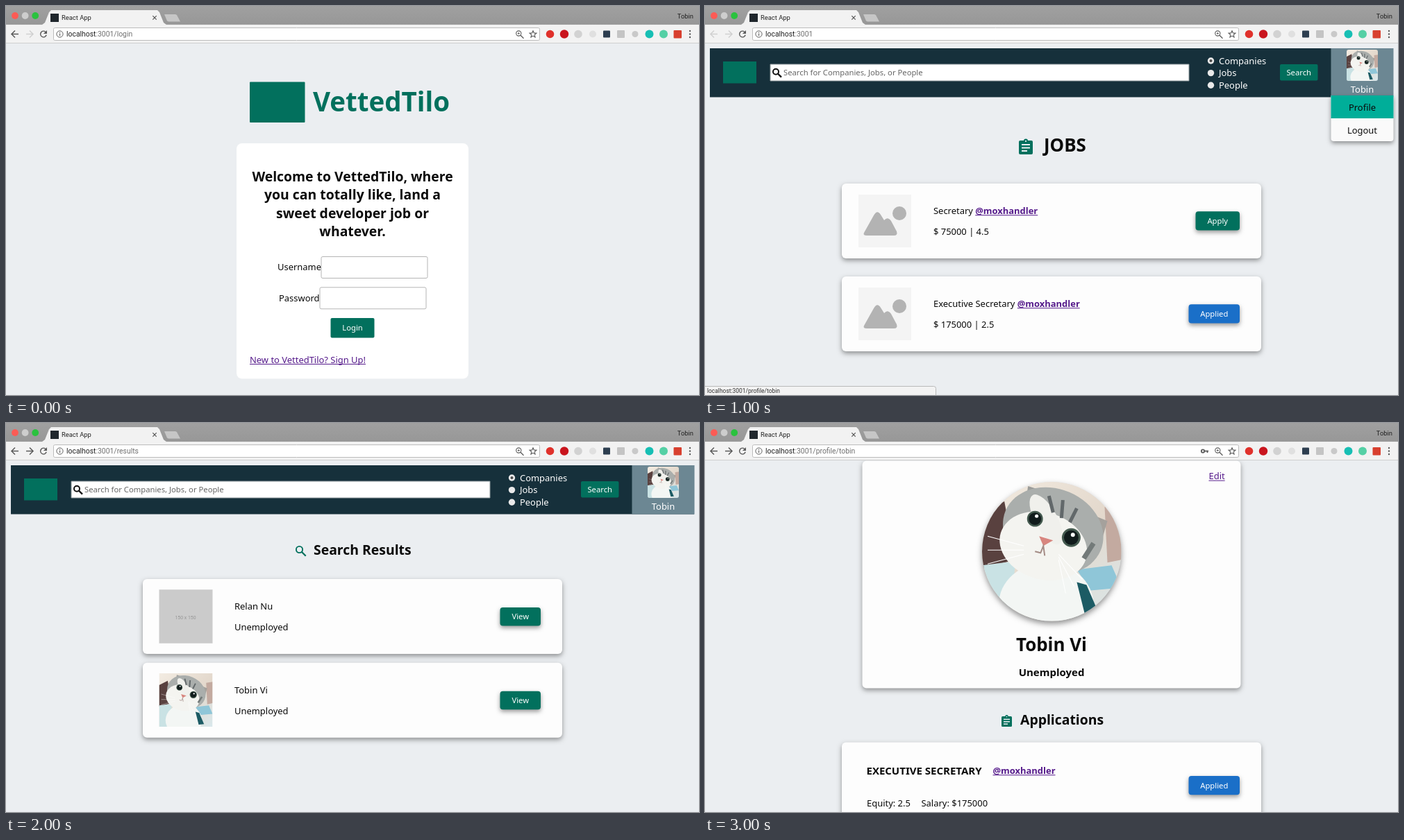
Recreate the animation shown at these times as an HTML page with a canvas. Size 998x561 px, loop 4000 ms.

```html
<!DOCTYPE html>
<html lang="en">
<head>
<meta charset="utf-8">
<title>Job board walkthrough</title>
<style>
html, body { margin: 0; width: 100%; height: 100%; overflow: hidden; background: #ebeef1; }
canvas { display: block; }
</style>
</head>
<body>
<canvas id="stage" width="998" height="561"></canvas>
<script>
const ctx = document.getElementById('stage').getContext('2d');
const PAGE = '"Noto Sans", "Open Sans", sans-serif';
const CHROME = 'Roboto, "Liberation Sans", sans-serif';
const GREEN = '#02705d', BLUE = '#1a6fc8', PURPLE = '#551a8b', INK = '#0a0a0a';
const BASE = 12.95, SMALL = 11.25;
const USER = 'Tobin', FULL_NAME = 'Tobin Vi', BRAND = 'VettedTilo', COMPANY = '@moxhandler';

function rect(x, y, w, h, fill, r = 0, stroke) {
  ctx.beginPath();
  ctx.roundRect(x, y, w, h, r);
  if (fill) { ctx.fillStyle = fill; ctx.fill(); }
  if (stroke) { ctx.strokeStyle = stroke; ctx.lineWidth = 1; ctx.stroke(); }
}

function disc(x, y, r, fill) {
  ctx.beginPath();
  ctx.arc(x, y, r, 0, Math.PI * 2);
  ctx.fillStyle = fill;
  ctx.fill();
}

function oval(x, y, rx, ry, turn, fill) {
  ctx.beginPath();
  ctx.ellipse(x, y, rx, ry, turn, 0, Math.PI * 2);
  ctx.fillStyle = fill;
  ctx.fill();
}

function ring(x, y, r, color, width, from = 0, to = Math.PI * 2) {
  ctx.beginPath();
  ctx.arc(x, y, r, from, to);
  ctx.strokeStyle = color;
  ctx.lineWidth = width;
  ctx.stroke();
}

function poly(points, fill) {
  ctx.beginPath();
  points.forEach(([x, y]) => ctx.lineTo(x, y));
  ctx.closePath();
  ctx.fillStyle = fill;
  ctx.fill();
}

function line(points, color, width) {
  ctx.beginPath();
  points.forEach(([x, y]) => ctx.lineTo(x, y));
  ctx.strokeStyle = color;
  ctx.lineWidth = width;
  ctx.stroke();
}

// Draws text and returns its width.
function text(str, x, y, { size = BASE, weight = 400, color = INK, align = 'left', font = PAGE } = {}) {
  ctx.font = `${weight} ${size}px ${font}`;
  ctx.textAlign = align;
  ctx.fillStyle = color;
  ctx.fillText(str, x, y);
  return ctx.measureText(str).width;
}

function link(str, x, y, weight = 400) {
  const w = text(str, x, y, { weight, color: PURPLE });
  rect(x, y + 1.3, w, 1, PURPLE);
}

function shadowed(blur, dy, alpha, paint) {
  ctx.save();
  ctx.shadowColor = `rgba(0,0,0,${alpha})`;
  ctx.shadowBlur = blur;
  ctx.shadowOffsetY = dy;
  paint();
  ctx.restore();
}

function card(x, y, w, h) {
  shadowed(7, 3, 0.4, () => rect(x, y, w, h, '#fdfdfd', 6));
}

function button(label, x, y, w, h, fill = GREEN, raised = true) {
  const paint = () => rect(x, y, w, h, fill, raised ? 4 : 2);
  raised ? shadowed(6, 3, 0.4, paint) : paint();
  text(label, x + w / 2, y + h / 2 + 4, { size: SMALL, weight: 500, color: '#fff', align: 'center' });
}

function glass(x, y, r, color, width) {
  ring(x, y, r, color, width);
  line([[x + r * 0.7, y + r * 0.7], [x + r * 2, y + r * 2]], color, width * 1.2);
}

function arrow(x, dir, color) {
  line([[x - 5 * dir, 40.5], [x + 5 * dir, 40.5]], color, 1.5);
  line([[x, 35.5], [x + 5 * dir, 40.5], [x, 45.5]], color, 1.5);
}

function clipboard(x, y, w) {
  const u = w / 20;
  rect(x, y + 2.5 * u, w, 20 * u, GREEN, 2 * u);
  disc(x + w / 2, y + 3 * u, 3 * u, GREEN);
  disc(x + w / 2, y + 3.4 * u, 1.1 * u, '#ebeef1');
  [[7.5, 12], [12, 12], [16.5, 8]].forEach(([dy, len]) =>
    rect(x + 4 * u, y + dy * u, len * u, 2 * u, '#ebeef1'));
}

function star(x, y, r) {
  ctx.beginPath();
  for (let i = 0; i < 10; i++) {
    const a = i * Math.PI / 5 - Math.PI / 2, d = i % 2 ? r * 0.45 : r;
    ctx.lineTo(x + d * Math.cos(a), y + d * Math.sin(a));
  }
  ctx.closePath();
  ctx.strokeStyle = '#5c5c5c';
  ctx.lineWidth = 1.1;
  ctx.stroke();
}

// Cat portrait in flat shapes, drawn in a unit square.
function cat(x, y, size, r) {
  ctx.save();
  ctx.beginPath();
  ctx.roundRect(x, y, size, size, r);
  ctx.clip();
  ctx.translate(x, y);
  ctx.scale(size, size);
  const wall = ctx.createLinearGradient(0, 0, 1, 1);
  wall.addColorStop(0, '#f3ece2');
  wall.addColorStop(0.55, '#e3d8cc');
  wall.addColorStop(1, '#d9e8ec');
  rect(0, 0, 1, 1, wall);
  poly([[0, 0.22], [0.16, 0.14], [0.24, 0.56], [0, 0.62]], '#59413f');
  poly([[0.88, 0.18], [1, 0.16], [1, 0.56], [0.9, 0.58]], '#c3aaa0');
  poly([[0.68, 0.63], [0.93, 0.6], [1, 0.76], [0.78, 0.78]], '#8fc6d8');
  poly([[0, 0.6], [0.24, 0.57], [0.2, 1], [0, 1]], '#c9e2e4');
  oval(0.46, 0.88, 0.34, 0.3, 0, '#f3f6f4');
  poly([[0.68, 0.72], [0.75, 0.74], [0.84, 0.95], [0.74, 0.96]], '#1c5b64');
  poly([[0.3, 0.24], [0.33, 0.03], [0.55, 0.1]], '#9b9c9a');
  poly([[0.7, 0.2], [0.9, 0.28], [0.83, 0.52]], '#a5a19c');
  oval(0.51, 0.35, 0.37, 0.3, 0.4, '#aaaeac');
  oval(0.44, 0.46, 0.32, 0.24, 0.3, '#f4f4f0');
  oval(0.46, 0.27, 0.08, 0.2, -0.5, '#f0f0ec');
  line([[0.48, 0.1], [0.51, 0.22]], '#62686a', 0.025);
  line([[0.58, 0.13], [0.57, 0.26]], '#62686a', 0.025);
  line([[0.68, 0.19], [0.63, 0.29]], '#62686a', 0.025);
  line([[0.8, 0.44], [0.73, 0.55]], '#737a79', 0.035);
  [[0.38, 0.265, 0.057], [0.64, 0.4, 0.067]].forEach(([ex, ey, er]) => {
    disc(ex, ey, er, '#43594e');
    disc(ex, ey, er * 0.78, '#111c1c');
    disc(ex + 0.012, ey - 0.02, er * 0.22, '#fff');
  });
  poly([[0.41, 0.39], [0.51, 0.42], [0.44, 0.46]], '#d8867f');
  line([[0.38, 0.5], [0.42, 0.51], [0.44, 0.46], [0.45, 0.53]], '#a48c86', 0.01);
  [0, 1, 2].forEach(i => {
    line([[0.3, 0.46 + i * 0.03], [0.04, 0.39 + i * 0.1]], '#fff', 0.005);
    line([[0.55, 0.52 + i * 0.02], [0.72 - i * 0.06, 0.7 + i * 0.05]], '#fff', 0.005);
  });
  ctx.restore();
}

function emptyPicture(x, y) {
  rect(x, y, 76, 76, '#f4f4f4');
  ctx.save();
  ctx.translate(x, y);
  disc(59, 27, 10, '#b3b3b3');
  ctx.beginPath();
  ctx.moveTo(8, 55);
  ctx.lineTo(22, 30);
  ctx.quadraticCurveTo(27, 21, 32, 29);
  ctx.lineTo(37, 37);
  ctx.quadraticCurveTo(42, 31, 47, 38);
  ctx.lineTo(55, 53);
  ctx.quadraticCurveTo(57, 59, 51, 59);
  ctx.lineTo(12, 59);
  ctx.quadraticCurveTo(6, 59, 8, 55);
  ctx.fillStyle = '#b3b3b3';
  ctx.fill();
  ctx.restore();
}

function extensions() {
  disc(783.5, 40.5, 5.8, '#e0312b');
  disc(804, 40.5, 6.2, '#c9151e');
  disc(824, 40.5, 5.8, '#d2d2d2');
  disc(845, 40.5, 5, '#e0e0e0');
  rect(860, 35.5, 10, 10, '#2d3e50', 1);
  rect(880, 35, 11, 11, '#c4c4c4', 1);
  disc(906, 40.5, 4.5, '#c9c9c9');
  disc(926.5, 40.5, 6, '#17bfb4');
  disc(947, 40.5, 6, '#55d0a5');
  rect(961.5, 35, 11.5, 11.5, '#d8402f', 1);
  [36, 40.5, 45].forEach(y => disc(985, y, 1.2, '#5a5a5a'));
}

function browser({ path, back, forward, key }) {
  const bar = ctx.createLinearGradient(0, 0, 0, 27);
  bar.addColorStop(0, '#a0a0a0');
  bar.addColorStop(1, '#979797');
  rect(0, 0, 998, 27, bar);
  rect(0, 26, 998, 28, '#f2f2f2');
  rect(0, 26, 998, 0.7, '#858585');
  rect(0, 53, 998, 1, '#cfcfcf');
  ['#fc5b55', '#cdcdcd', '#2ac23e'].forEach((c, i) => disc(13 + i * 14.6, 14, 4.9, c));

  poly([[52, 27], [56, 24], [62, 9], [65, 6], [218, 6], [221, 9], [227, 24], [231, 27]], '#f2f2f2');
  poly([[228, 12], [244, 12], [246, 13], [251, 22.5], [234, 22.5], [232, 21.5]], '#c6c6c6');
  rect(64, 11, 12, 12, '#20272d');
  text('React App', 80, 20, { size: 9.4, font: CHROME, color: '#222' });
  line([[211.3, 14.2], [216.7, 19.6]], '#555', 1.2);
  line([[216.7, 14.2], [211.3, 19.6]], '#555', 1.2);
  text(USER, 990, 18, { size: 9.4, font: CHROME, color: '#222', align: 'right' });

  arrow(13, -1, back ? '#5a5a5a' : '#d0d0d0');
  arrow(34, 1, forward ? '#5a5a5a' : '#d0d0d0');
  ring(54, 40.5, 4.3, '#5a5a5a', 1.5, 0.3, 5.5);
  poly([[59, 35], [59, 40], [54, 40]], '#5a5a5a');

  rect(68.5, 31.5, 700, 18, '#fff', 2, '#bcbcbc');
  ring(77.5, 40.5, 4.6, '#5c5c5c', 1);
  rect(77, 39.8, 1.1, 3.3, '#5c5c5c');
  rect(77, 37.7, 1.1, 1.2, '#5c5c5c');
  const url = { size: 10.4, font: CHROME };
  const w = text('localhost', 87, 44, { ...url, color: '#222' });
  text(':3001' + path, 87 + w, 44, { ...url, color: '#707070' });
  if (key) {
    ring(717, 40.5, 2.2, '#5c5c5c', 1.8);
    line([[719, 40.5], [725, 40.5]], '#5c5c5c', 1.8);
    line([[723.5, 40.5], [723.5, 43]], '#5c5c5c', 1.6);
  }
  glass(738.3, 39.5, 3.6, '#5c5c5c', 1.1);
  line([[736.7, 39.5], [739.9, 39.5]], '#5c5c5c', 0.9);
  line([[738.3, 37.9], [738.3, 41.1]], '#5c5c5c', 0.9);
  star(759, 40.8, 5.2);
  extensions();
}

function navbar() {
  const white = { size: BASE, weight: 500, color: '#fff' };
  rect(7, 61, 984, 70.5, '#16303b');
  rect(26, 80, 48, 31.5, GREEN);
  rect(94, 84, 603, 24, '#fff', 0, '#8c979b');
  glass(102, 94.7, 4, '#111', 2);
  text('Search for Companies, Jobs, or People', 113, 100, { size: SMALL, color: '#666' });
  ['Companies', 'Jobs', 'People'].forEach((label, i) => {
    const y = 79 + i * 17.6;
    disc(728.5, y, 4.7, '#e9e9e9');
    if (!i) disc(728.5, y, 2, '#4a4a4a');
    text(label, 740, y + 4.6, white);
  });
  button('Search', 828, 84, 54.5, 23.5, GREEN, false);
  rect(901.5, 61, 90, 70.5, '#6c8793');
  cat(924, 63, 45, 3);
  text(USER, 946.5, 125, { ...white, align: 'center' });
}

function menu() {
  shadowed(6, 3, 0.4, () => rect(901.5, 129, 90, 66, '#fafafa', [0, 0, 4, 4]));
  rect(901.5, 129, 90, 33, '#00ae99');
  text('Profile', 946.5, 150.5, { align: 'center' });
  text('Logout', 946.5, 183.5, { align: 'center' });
}

function login() {
  rect(351, 109.5, 79.5, 58.5, GREEN, 1);
  text(BRAND, 442, 152, { size: 38.5, weight: 700, color: GREEN });
  rect(332, 198, 334, 339.5, '#fff', 8);
  [`Welcome to ${BRAND}, where`, 'you can totally like, land a', 'sweet developer job or', 'whatever.']
    .forEach((row, i) => text(row, 499, 253 + i * 26.4, { size: 19.4, weight: 700, align: 'center' }));
  text('Username', 391, 381.3);
  rect(454, 361.5, 153, 31, '#fff', 2, '#b5b5b5');
  text('Password', 393, 426);
  rect(452, 405.8, 153, 31, '#fff', 2, '#b5b5b5');
  button('Login', 467.5, 450, 63, 28.5, GREEN, false);
  link(`New to ${BRAND}? Sign Up!`, 351, 514.8);
}

function job(y, title, detail, label, x, fill) {
  card(197, y, 604, 108);
  emptyPicture(221, y + 16);
  const w = text(title + ' ', 329, y + 44);
  link(COMPANY, 329 + w, y + 44, 700);
  text(detail, 329, y + 74);
  button(label, x, y + 40.2, 770 - x, 27.2, fill);
}

function jobs() {
  navbar();
  menu();
  clipboard(452, 191.5, 20);
  text('JOBS', 488, 210, { size: 25.9, weight: 700 });
  job(256, 'Secretary', '$ 75000 | 4.5', 'Apply', 706.5, GREEN);
  job(390, 'Executive Secretary', '$ 175000 | 2.5', 'Applied', 696.5, BLUE);
  rect(-0.5, 548.5, 333, 14, '#f3f3f3', [0, 3, 0, 0], '#b9b9b9');
  text('localhost:3001/profile/tobin', 3, 557.7, { size: 8.45, font: CHROME, color: '#333' });
}

function person(y, name) {
  card(197, y, 604, 108);
  text(name, 329, y + 43.8);
  text('Unemployed', 329, y + 74.3);
  button('View', 711.5, y + 41, 58.5, 26.5);
}

function results() {
  navbar();
  glass(422.5, 182.5, 4.6, GREEN, 1.9);
  text('Search Results', 443, 190, { size: 19.4, weight: 700 });
  person(225, 'Relan Nu');
  rect(220.5, 240.3, 77, 77.5, '#cbcbcb');
  text('150 x 150', 258.5, 282.5, { size: 6.9, font: CHROME, color: '#969696', align: 'center' });
  person(345.7, FULL_NAME);
  cat(220.5, 361, 77, 0);
}

function profile() {
  card(226.5, 54.5, 545, 328);
  link('Edit', 725.5, 81.3);
  shadowed(8, 4, 0.45, () => disc(499.3, 185.3, 100, '#e3d8cc'));
  cat(399, 85, 200.6, 100.3);
  text(FULL_NAME, 499, 329, { size: 25.9, weight: 700, align: 'center' });
  text('Unemployed', 499, 364.7, { size: 15, weight: 700, align: 'center' });
  clipboard(427, 421, 15);
  text('Applications', 454, 435, { size: 19.4, weight: 700 });
  card(197, 460.5, 604, 120);
  text('EXECUTIVE SECRETARY', 232.5, 507, { size: 15, weight: 700 });
  link(COMPANY, 414.5, 506, 700);
  text('Equity: 2.5', 233, 552.8);
  text('Salary: $175000', 311.5, 552.8);
  button('Applied', 696.5, 509, 73.5, 27.2, BLUE);
}

const scenes = [
  { draw: login, path: '/login', back: true },
  { draw: jobs, path: '' },
  { draw: results, path: '/results', back: true, forward: true },
  { draw: profile, path: '/profile/tobin', back: true, forward: true, key: true }
];

const start = performance.now();
function tick() {
  const scene = scenes[Math.floor((performance.now() - start) / 1000) % scenes.length];
  rect(0, 0, 998, 561, '#ebeef1');
  scene.draw();
  browser(scene);
  requestAnimationFrame(tick);
}
tick();
</script>
</body>
</html>
```
